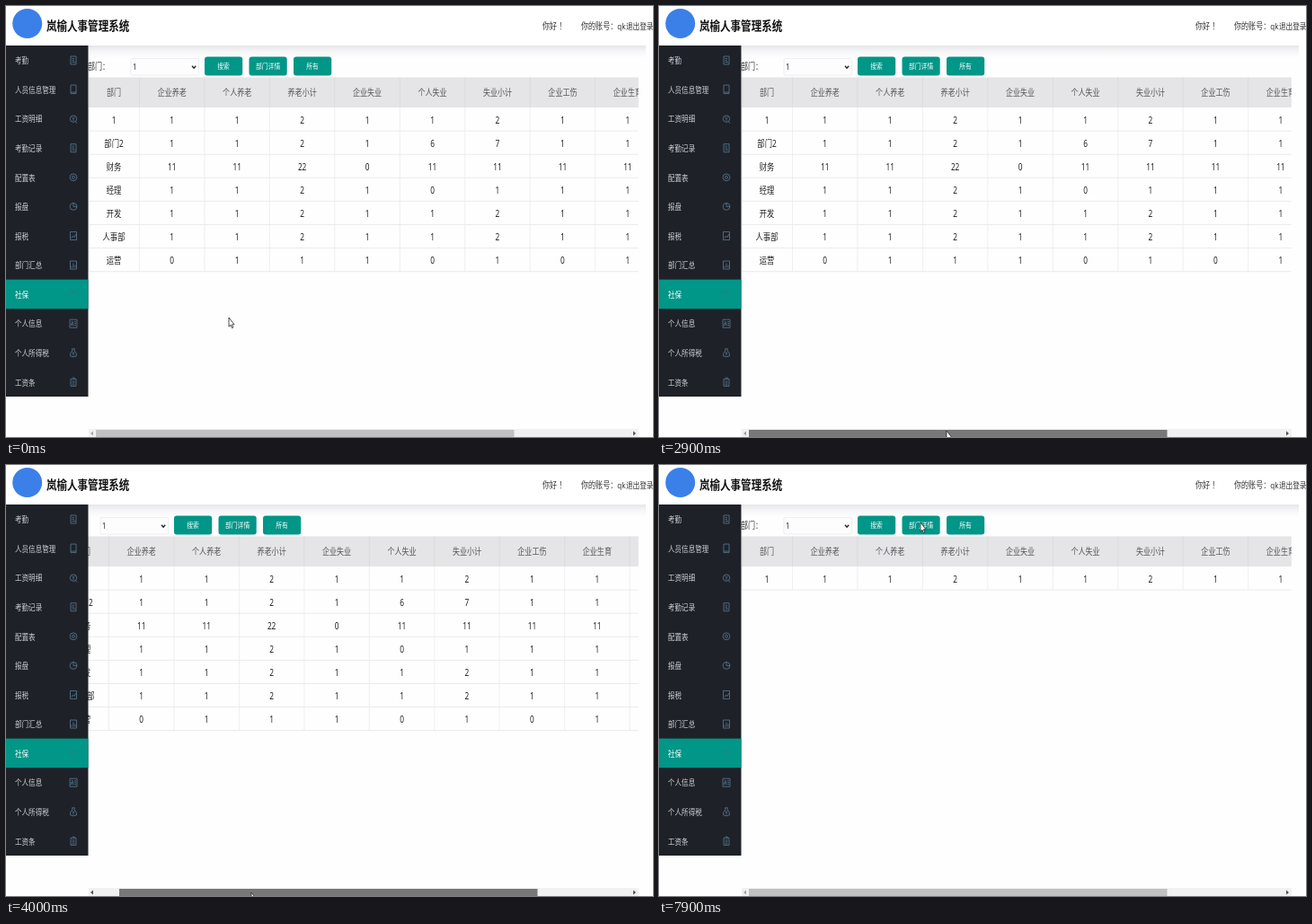
An HTML page that plays this animation: 720 px wide and 480 px high, repeating every 8000 ms.

```html
<!DOCTYPE html>
<html lang="zh-CN">
<head>
<meta charset="utf-8">
<title>人事管理系统</title>
<style>
  html, body { margin: 0; width: 100%; height: 100%; overflow: hidden; background: #fefefe; }
  svg { display: block; width: 720px; height: 480px; }
  text { font-family: "Noto Sans", "Noto Sans CJK SC", "Noto Sans CJK", sans-serif; white-space: pre; }
</style>
</head>
<body>
<svg id="stage" viewBox="0 0 720 480" xmlns="http://www.w3.org/2000/svg"></svg>
<script>
const LOOP = 8000, STEP = 100;
const TEAL = '#009688', DARK = '#1f2129', LINE = '#ebebed';
const NARROW = 0.83; // the whole page is shown slightly condensed
const TOP = 113, ROW = 26.1, FIRST = 148.5, COL = 72.45;
const MENU_TOP = 44, MENU_ROW = 32.58;

const label = (x, cy, str, { size = 10, fill = '#333', anchor = 'start', weight = 400 } = {}) =>
  `<text transform="translate(${x} ${cy + size * 0.36}) scale(${NARROW} 1)" font-size="${size}" ` +
  `fill="${fill}" text-anchor="${anchor}" font-weight="${weight}">${str}</text>`;
const rect = (x, y, w, h, fill, extra = '') =>
  `<rect x="${x}" y="${y}" width="${w}" height="${h}" fill="${fill}" ${extra}/>`;
const path = (d, extra = '') => `<path d="${d}" ${extra}/>`;

// Icons are drawn around their own centre.
const page = 'M-3-4.5H3V4.5H-3ZM-1.5-2H1M-1.5 0H1M-1.5 2H2';
const box = 'M-3.5-4.5H3.5V4.5H-3.5Z';
const ring = r => `M${-r} 0A${r} ${r} 0 1 1 ${r} 0A${r} ${r} 0 1 1 ${-r} 0`;
const menu = [
  ['考勤', page],
  ['人员信息管理', 'M-3-5H3V4.5H-3ZM-3 3H3'],
  ['工资明细', ring(3.7) + 'M2.5 3L4 5M-1.5-2L0 0L1.5-2M0 0V2.5'],
  ['考勤记录', page],
  ['配置表', ring(3.9) + ring(1.5)],
  ['报盘', ring(3.9) + 'M0-4.5V0H4'],
  ['报税', box + 'M-2 2.5L-.5 0L1 1.5L3-2'],
  ['部门汇总', box + 'M-2 3V1M0 3V-2M2 3V0'],
  ['社保', 'M-4-3.5H4M-4-1.5H4M-3 1L-1 3L3-1'],
  ['个人信息', 'M-4-4.5H4V4.5H-4ZM-2.5 2.5V0H-.5V2.5M-2.3-2H-.7V0M1-2H3M1 0H3M1 2H3'],
  ['个人所得税', 'M-1.5-4.5H1.5L1-2.5Q4 0 3.5 3.5Q0 5.5-3.5 3.5Q-4 0-1-2.5ZM-1.3-1L0 .8L1.3-1M0 .8V3'],
  ['工资条', 'M-3-3.5H3V4.5H-3ZM-1.2-4.8H1.2V-3.5M-1.5-1H1.5M-1.5 1H1.5M-1.5 3H1.5'],
];
const ACTIVE = 8;

const heads = ['部门', '企业养老', '个人养老', '养老小计', '企业失业', '个人失业', '失业小计',
  '企业工伤', '企业生育', '企业合计', '个人合计'];
const rows = [
  '1 1 1 2 1 1 2 1 1 4 2', '部门2 1 1 2 1 6 7 1 1 4 7', '财务 11 11 22 0 11 11 11 11 33 22',
  '经理 1 1 2 1 0 1 1 1 4 1', '开发 1 1 2 1 1 2 1 1 4 2', '人事部 1 1 2 1 1 2 1 1 4 2',
  '运营 0 1 1 1 0 1 0 1 2 1',
].map(r => r.split(' '));
const END = FIRST + COL * 10;
const colMid = i => i ? FIRST + COL * (i - 0.5) : 120;

function cells(values, cy, style) {
  return values.map((v, i) => label(colMid(i), cy, v, { anchor: 'middle', ...style })).join('');
}
function dividers(y, h, colour) {
  let d = `M92.5 ${y}v${h}`;
  for (let i = 0; i <= 10; i++) d += `M${FIRST + COL * i} ${y}v${h}`;
  return path(d, `stroke="${colour}" stroke-width=".8"`);
}
function bodyRow(values, i) {
  const y = TOP + ROW * i;
  return cells(values, y + 14, { fill: '#222' }) + dividers(y, ROW, LINE) +
    path(`M92 ${y + ROW}H${END}`, `stroke="${LINE}"`);
}
function button(x, str) {
  return rect(x, 56.5, 42.2, 21, TEAL, 'rx="3"') +
    label(x + 21.1, 67.3, str, { size: 8.2, fill: '#fff', anchor: 'middle', weight: 500 });
}

function content() {
  return label(91, 67.5, '部门：', { size: 9.7 }) +
    rect(139, 58.5, 75.5, 18.5, '#fdfdfe', 'stroke="#ededf3" rx="1"') +
    label(141, 68, '1', { size: 9, fill: '#222' }) +
    path('M207 66.8L209.1 69.2L211.2 66.8', 'fill="none" stroke="#222" stroke-width="1.3"') +
    button(221, '搜索') + button(270.5, '部门详情') + button(320, '所有') +
    rect(92, 79.5, END - 92, TOP - 79.5, '#e5e4e6') + dividers(79.5, 33.5, '#dadadc') +
    cells(heads, 97, { size: 9.7, fill: '#555' }) +
    bodyRow(rows[0], 0) +
    `<g id="others">${rows.slice(1).map((r, i) => bodyRow(r, i + 1)).join('')}</g>`;
}

function sidebar() {
  return rect(0, MENU_TOP, 91.5, 391, DARK) +
    rect(0, MENU_TOP + MENU_ROW * ACTIVE, 91.5, MENU_ROW, TEAL) +
    menu.map(([name, icon], i) => {
      const cy = MENU_TOP + MENU_ROW * (i + 0.5) + 0.7, on = i === ACTIVE;
      return label(10, cy, name, { size: 9.1, fill: on ? '#fff' : '#cfd0d3', weight: on ? 500 : 400 }) +
        path(icon, `transform="translate(75 ${cy - 0.5})" fill="none" stroke-width=".8" ` +
          `stroke="${on ? '#237f91' : '#587b91'}"`);
    }).join('');
}

function header() {
  return rect(92, 44, 620, 14, 'url(#shade)') + rect(0, 0, 720, 44, '#fff') +
    '<circle cx="23.7" cy="19.5" r="16.5" fill="#3b80e8"/>' +
    label(45, 22.2, '岚榆人事管理系统', { size: 13.9, fill: '#111', weight: 700 }) +
    label(597, 22.5, '你好 ！', { size: 9.7 }) +
    label(640, 22.5, '你的账号：qk', { size: 9.7 }) +
    label(690, 22.5, '退出登录', { size: 9.2 });
}

function scrollbar() {
  return rect(92, 471, 612, 9, '#f1f1f1') + rect(100, 472, 465.5, 8, '#c1c1c1', 'id="thumb"') +
    path('M97 473.5v5L94 476Z', 'id="left"') + path('M698 473.5v5L701 476Z', 'id="right"');
}

const cursors =
  path('M0 0V10.2L2 8.3L3.5 11.7L4.9 11L3.4 7.8H6Z',
    'id="arrow" fill="#fff" stroke="#222" stroke-width=".8"') +
  path('M-.8.6Q0-.7.9.6V4.2L2.2 4.5L3.5 4.9L4.8 5.5V9L3.8 12.2H-.4L-3.2 7.5Q-2.8 6.3-.8 8Z',
    'id="hand" fill="#fff" stroke="#222" stroke-width=".8"');

const stage = document.getElementById('stage');
stage.innerHTML = `<defs>
    <linearGradient id="shade" x2="0" y2="1"><stop stop-color="#e6e6e9"/>
      <stop offset=".45" stop-color="#f5f5f7"/><stop offset="1" stop-color="#fefefe"/></linearGradient>
    <clipPath id="view"><rect x="91" y="44" width="612.8" height="426"/></clipPath>
  </defs>` + rect(0, 0, 720, 480, '#fefefe') + header() +
  `<g clip-path="url(#view)"><g id="content">${content()}</g></g>` +
  sidebar() + scrollbar() + cursors;
const el = id => document.getElementById(id);

// Keys: time, then one or two values.
const pointer = [
  [0, 248, 347], [700, 248, 347], [1200, 227, 311], [1800, 229, 318], [2500, 318, 473],
  [2900, 320, 473], [3350, 452, 477], [3500, 452, 477], [3600, 432, 477], [4000, 273, 476],
  [4200, 268, 474], [4600, 262, 375], [5300, 235, 64], [6500, 235, 64], [7200, 291, 64],
];
const drag = [[2900, 0], [3350, 130], [3600, 130], [4000, 26], [4100, 0]];

function at(keys, t) {
  const next = keys.findIndex(k => k[0] > t);
  if (next === 0) return keys[0].slice(1);
  if (next < 0) return keys[keys.length - 1].slice(1);
  const a = keys[next - 1], b = keys[next];
  const p = (t - a[0]) / (b[0] - a[0]), e = p * p * (3 - 2 * p);
  return a.slice(1).map((v, i) => v + (b[i + 1] - v) * e);
}
const show = (id, on) => el(id).setAttribute('visibility', on ? 'visible' : 'hidden');

function draw(time) {
  const t = Math.floor((time % LOOP) / STEP) * STEP;
  const [x, y] = at(pointer, t), [shift] = at(drag, t);
  const pressed = t >= 2800 && t < 4200;
  const hovered = t >= 2500 && t < 4300;
  el('content').setAttribute('transform', `translate(${-shift * 1.308} 0)`);
  el('thumb').setAttribute('x', 100 + shift);
  el('thumb').setAttribute('fill', pressed ? '#787878' : hovered ? '#a8a8a8' : '#c1c1c1');
  el('left').setAttribute('fill', shift > 0 ? '#505050' : '#a3a3a3');
  el('right').setAttribute('fill', shift < 129 ? '#505050' : '#a3a3a3');
  show('others', t < 5700);
  const overSearch = y < 77 && x < 263;
  show('hand', overSearch);
  show('arrow', !overSearch);
  for (const id of ['hand', 'arrow']) el(id).setAttribute('transform', `translate(${x} ${y})`);
}

const start = performance.now();
function tick() {
  draw(performance.now() - start);
  requestAnimationFrame(tick);
}
tick();
</script>
</body>
</html>
```
